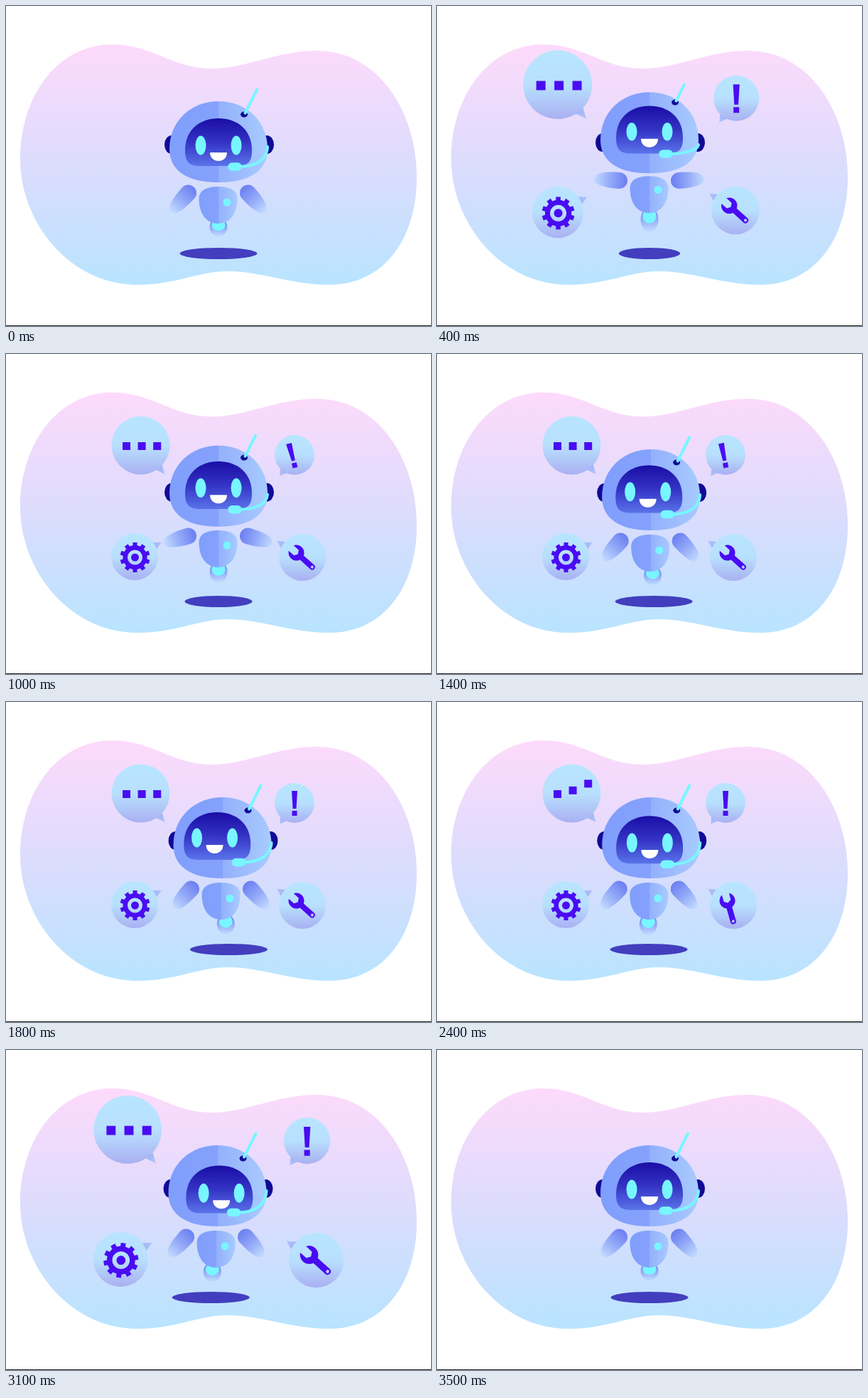
An HTML page with a canvas for the animation above (3600 ms loop, 598 px wide and 450 px high).

```html
<!DOCTYPE html>
<html lang="en">
<head>
<meta charset="utf-8">
<title>Helper robot</title>
<style>
html, body { margin: 0; width: 100%; height: 100%; overflow: hidden; background: #fff; }
canvas { display: block; }
</style>
</head>
<body>
<canvas id="stage" width="598" height="450"></canvas>
<script>
const ctx = document.getElementById('stage').getContext('2d');
const LOOP = 3600, STEP = 100;
const CYAN = '#78f6ff', NAVY = '#120a96', INK = '#4a0cf2';

const shapes = {
  blob: 'M20 215C20 130 70 54 150 54C205 54 235 88 288 88C340 88 380 63 437 63C525 63 578 150 578 240C578 330 530 392 455 392C400 392 360 373 312 373C270 373 240 392 185 392C90 392 20 305 20 215Z',
  head: 'M230 201C230 161 261 134 299 134S368 161 368 201C368 231 344 248 299 248S230 231 230 201Z',
  visor: 'M252 203C252 173 274 158 299 158S346 173 346 203C346 221 339 225 324 225H274C259 225 252 221 252 203Z',
  mouth: 'M287 206H311C311 222 287 222 287 206Z',
  body: 'M271.5 271C271.5 259 283 254 298.5 254S325.5 259 325.5 271C325.5 292 315 306 298.5 306S271.5 292 271.5 271Z',
  arm: 'M0-11.5C20-11.5 36-9 36 1C36 9 15 11.5 0 11.5A11.5 11.5 0 0 1 0-11.5Z',
  bang: 'M-4-31H4L2.5-6H-2.5ZM-3.5-3H3.5V4H-3.5Z',
  jaw: 'M-9.7-5.2A11 11 0 1 1-9.7 5.2L0 5L3 0L0-5Z'
};
for (const name in shapes) shapes[name] = new Path2D(shapes[name]);

function gradient(x0, y0, x1, y1, ...colors) {
  const g = ctx.createLinearGradient(x0, y0, x1, y1);
  colors.forEach((c, i) => g.addColorStop(i / (colors.length - 1), c));
  return g;
}
// Flat on the left half, a small step at the middle, lighter to the right.
function metal(left, right) {
  const g = gradient(left, 0, right, 0, '#809efc', '#84a2fc', '#a8cbff');
  g.addColorStop(0.5, '#93b0fc');
  return g;
}
const paint = {
  blob: gradient(0, 55, 0, 392, '#fddafb', '#dcdcfd', '#b8e4ff'),
  head: metal(230, 368),
  visor: gradient(0, 158, 0, 225, '#1a0da6', '#3433c4', '#5a73ea'),
  body: metal(272, 326),
  arm: gradient(-11, 0, 36, 0, '#6b7ef2', '#93a9f8', '#c3dcff')
};

const clamp = v => Math.max(0, Math.min(1, v));
function ease(t, from, to) {
  const p = clamp((t - from) / (to - from));
  return p * p * (3 - 2 * p);
}
const bump = (t, start, top, leave, end) => ease(t, start, top) - ease(t, leave, end);

function ellipse(x, y, rx, ry, color) {
  ctx.fillStyle = color;
  ctx.beginPath();
  ctx.ellipse(x, y, rx, ry, 0, 0, 7);
  ctx.fill();
}
function fill(name, color = paint[name]) {
  ctx.fillStyle = color;
  ctx.fill(shapes[name]);
}
function line(width, color, draw) {
  ctx.lineWidth = width;
  ctx.strokeStyle = color;
  ctx.lineCap = 'round';
  ctx.beginPath();
  draw();
  ctx.stroke();
}
function at(x, y, degrees, draw) {
  ctx.save();
  ctx.translate(x, y);
  ctx.rotate(degrees * Math.PI / 180);
  draw();
  ctx.restore();
}

// Icons are drawn around the center of their bubble.
function dots(t) {
  ctx.fillStyle = INK;
  for (let i = 0; i < 3; i++) {
    const hop = 15 * Math.sin(Math.PI * clamp((t - 1980 - 100 * i) / 400)) ** 2;
    ctx.fillRect(-25.5 + 21.6 * i, -4.5 - hop, 11, 11);
  }
}
function bang(t) {
  const shake = 15 * Math.sin(4 * Math.PI * clamp((t - 663) / 900));
  at(0, 14, shake, () => fill('bang', INK));
}
function gear(t) {
  at(0.5, 1, 80 * ease(t, 2400, 3100), () => {
    line(6.5, INK, () => ctx.arc(0, 0, 13.8, 0, 7));
    ellipse(0, 0, 5.5, 5.5, INK);
    for (let i = 0; i < 10; i++) {
      ctx.rotate(Math.PI / 5);
      ctx.fillRect(-3, -21, 6, 6);
    }
  });
}
function wrench(t) {
  at(-8.5, -6.5, 42 + 32 * bump(t, 1850, 2350, 2400, 2750), () => {
    fill('jaw', INK);
    line(8, INK, () => { ctx.moveTo(8, 0); ctx.lineTo(30, 0); });
    ellipse(30, 0, 2, 2, '#b4cffa');
  });
}

// center, radius, tail direction, icon
const bubbles = [
  [189.5, 128.5, 41, 50, dots],
  [406, 142, 28, 125, bang],
  [181, 285, 33, -28, gear],
  [417, 286, 33, -147, wrench]
];

// Bubbles spring out of the robot one by one and are pulled back in together.
function bubble(t, [x, y, r, tail, icon], i) {
  const q = t < 1500 ? clamp(1 - (t - 155 - 25 * i) / 600) : clamp((t - 2735) / 600);
  const scale = 1 + q * q * (2.7 - 3.7 * q);
  if (scale < 0.01) return;
  ctx.save();
  ctx.translate(300, 228);
  ctx.scale(scale, scale);
  ctx.translate(x - 300, y - 228);
  at(0, 0, tail, () => {
    const tip = r * 1.3;
    ctx.fillStyle = gradient(r - 4, 0, tip, 0, '#9fb0f3', '#b2c6fa');
    ctx.beginPath();
    ctx.moveTo(tip, 0);
    ctx.lineTo(r - 4, 7);
    ctx.lineTo(r - 4, -7);
    ctx.fill();
  });
  ellipse(0, 0, r, r, gradient(0, -r, 0, r, '#b8e5ff', '#b8e0fe', '#a9b0f2'));
  icon(t);
  ctx.restore();
}

function robot(t) {
  const jump = bump(t, 150, 620, 700, 1130);
  const reach = bump(t, 150, 620, 700, 1190);
  const happy = bump(t, 350, 500, 750, 900);
  // One swing to the right and back through the left, while the gaze goes against it.
  const p = clamp((t - 1250) / 2250);
  const sway = Math.sin(2 * Math.PI * p) * (1.07 - 0.3 * p);
  const drift = Math.sin(Math.PI * p);

  const headX = 3.8 * sway + 2.5 * drift, bodyX = 4 * sway;
  const bodyY = -27 * jump, lift = -32 * jump, earY = -10 * jump * jump;

  ellipse(299 + 14.5 * sway, 348, 54.5 - 20.5 * reach, 8, '#423ebe');

  const jetX = 299 + 11 * sway - drift, base = 306 + bodyY;
  const flame = 10 + 8 * jump + 2 * drift, end = base + flame * 1.8;
  ellipse(jetX, (base - 8 + end) / 2, 12.5, (end - base + 8) / 2,
    gradient(0, base, 0, end, '#7d92f3', '#c0dcff'));
  ellipse(jetX, base - 3 + flame / 2, 9.5, flame / 2 + 3, CYAN);

  for (const side of [-1, 1]) {
    ctx.save();
    ctx.translate(298.5 + bodyX, 263 + lift);
    ctx.scale(side, 1);
    at(42, 0, 48 - 95 * reach, () => fill('arm'));
    ctx.restore();
  }

  at(bodyX, bodyY, 0, () => fill('body'));
  ellipse(311 + bodyX, 276 + lift, 5.5, 5.5, CYAN);

  for (const x of [233, 367]) ellipse(x + headX, 195 + earY, 10, 13, NAVY);
  at(headX, -23.5 * jump, 0, () => fill('head'));
  at(-1.8 * sway, lift - 4.5 * sway + 2 * drift, 0, () => fill('visor'));

  at(-5.5 * sway, -35 * jump - 6 * sway + 1.5 * drift, 0, () => {
    for (const x of [274, 324]) {
      ellipse(x, 196, 7.5, 13.5 - 3 * happy, CYAN);
      if (happy > 0) ellipse(x, 224 - 13 * happy, 5 + 2 * happy, 10 * happy, paint.visor);
    }
    fill('mouth', '#fff');
  });

  // The antenna shortens as the head tips back.
  const ax = 335 + headX, ay = 152.5 - 31 * jump, len = 1 - 0.53 * jump;
  ellipse(ax, ay, 5, 4, NAVY);
  line(4, CYAN, () => {
    ctx.moveTo(ax + 1.5, ay - 2);
    ctx.lineTo(ax + 18 * len, ay - 35 * len);
  });

  const mx = 322 + headX, my = 226 - 33 * jump - 2 * sway + 2 * drift;
  line(4, CYAN, () => {
    ctx.moveTo(mx + 6, my);
    ctx.bezierCurveTo(mx + 26, my, mx + 45, my - 8 + 5 * jump, 368 + headX, 198 + earY);
  });
  line(11.5, CYAN, () => { ctx.moveTo(mx - 4, my); ctx.lineTo(mx + 4, my); });
}

function draw() {
  const t = Math.floor(performance.now() / STEP) * STEP % LOOP;
  ctx.fillStyle = '#fff';
  ctx.fillRect(0, 0, 598, 450);
  fill('blob');
  bubbles.forEach((b, i) => bubble(t, b, i));
  robot(t);
  ctx.fillStyle = '#222';
  ctx.fillRect(0, 449, 598, 1);
  requestAnimationFrame(draw);
}
draw();
</script>
</body>
</html>
```
